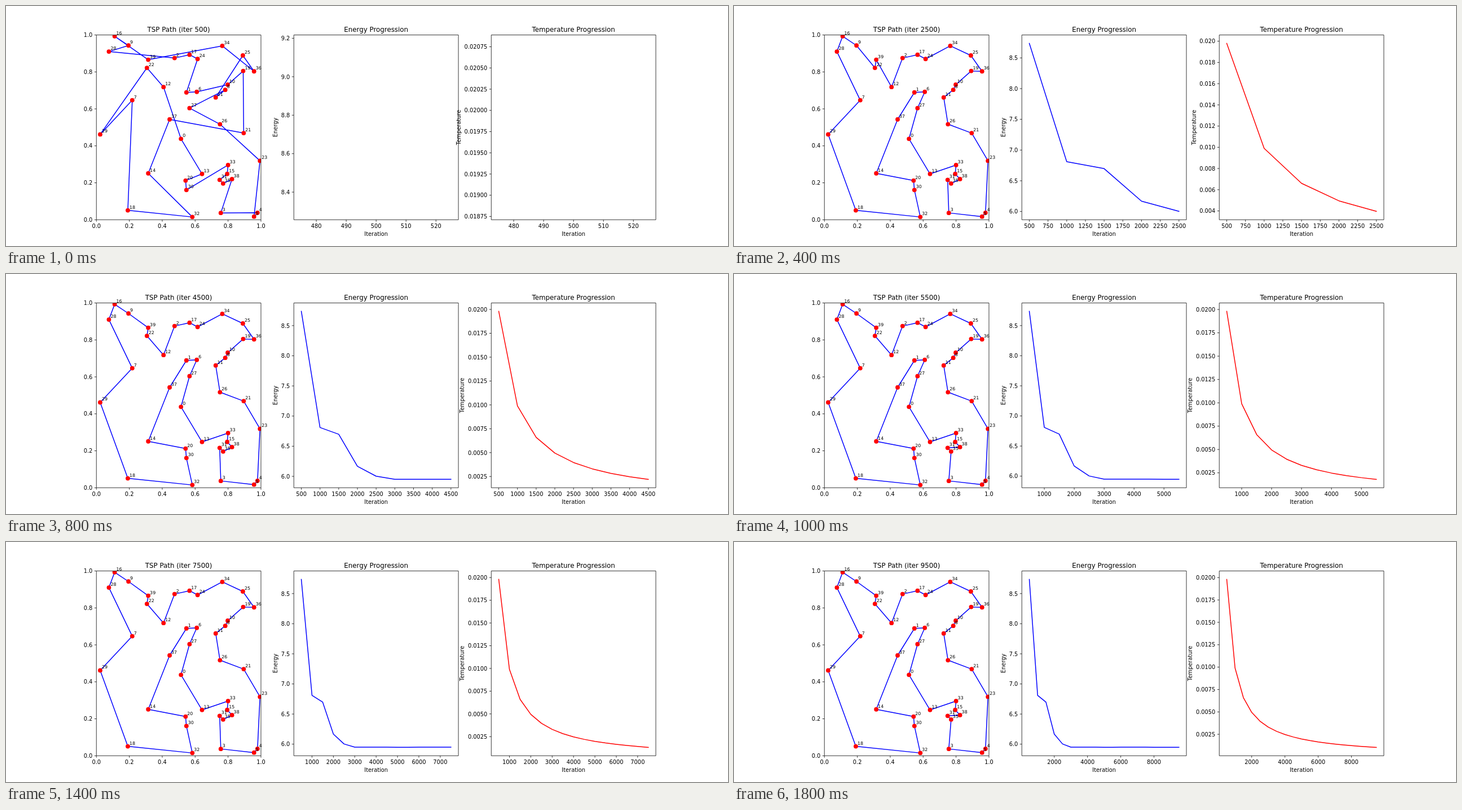
Write an HTML page with a canvas that moves like this. It is 1280x427 px and loops after 1.9 s.

```html
<!DOCTYPE html>
<html lang="en">
<head>
<meta charset="utf-8">
<title>Simulated annealing progress</title>
<style>
  html, body { margin: 0; width: 100%; height: 100%; overflow: hidden; background: #fff; }
  canvas { display: block; }
</style>
</head>
<body>
<canvas id="stage" width="1280" height="427"></canvas>
<script>
const ctx = document.getElementById('stage').getContext('2d');
const PT = 0.98765;                      // one typographic point in stage pixels
const TOP = 51.5, BOTTOM = 380.3, WIDTH = 291.76, HEIGHT = BOTTOM - TOP;
const LEFTS = [160.25, 510.3, 860.3];
const STEP_MS = 100, STEPS = 19, ITERATIONS = 500;

// City positions in thousandths of the unit square; the index is the label.
const cities = `514,438 547,689 475,875 756,37 979,38 958,17 610,692 218,647 783,703 195,943
  798,731 725,662 408,718 642,248 315,251 795,248 111,993 566,893 191,51 892,805
  542,212 895,469 307,822 994,319 615,870 890,889 751,517 566,604 76,910 23,462
  547,161 749,216 583,15 800,296 765,941 770,196 958,803 445,543 824,220 315,866`
  .split(/\s+/).map(pair => pair.split(',').map(v => v / 1000));

const distance = (a, b) =>
  Math.hypot(cities[a][0] - cities[b][0], cities[a][1] - cities[b][1]);

// Closed tour through the waypoints; every other city joins where its detour is shortest.
function tourThrough(waypoints) {
  const tour = waypoints.split(' ').map(Number);
  for (let city = 0; city < cities.length; city++) {
    if (tour.includes(city)) continue;
    const detours = tour.map((a, i) => {
      const b = tour[(i + 1) % tour.length];
      return distance(a, city) + distance(city, b) - distance(a, b);
    });
    tour.splice(detours.indexOf(Math.min(...detours)) + 1, 0, city);
  }
  return tour.join(' ');
}

// Working back from the best tour, each one has another stretch out of order.
const start = tourThrough('16 9 28 2 17 24 6 10 19 21 37 14 32 7 29 22 13 30 33 31 38 4 5 23 26 27 8 11 25 36 34 39');
const best = tourThrough('16 12 34 36 19 23 3 33 0 6 14 32 29');
const settled = best.replace('35 31', '31 35');
const fourth = settled.replace('39 22', '22 39');
const third = fourth.replace('39 12 2', '39 2 12').replace('27 6 1', '1 6 27');
const second = third.replace('19 10 8 11 26 21', '10 11 8 19 21 26');
const first = second.replace('20 30', '30 20').replace(' 4 5 ', ' 5 4 ');
const opening = [start, first, second, third, fourth];

const isBest = k => k === 9 || k === 10 || k >= 15;
const tours = Array.from({ length: STEPS }, (_, k) =>
  (opening[k] || (isBest(k) ? best : settled)).split(' '));
const energies = tours.map(tour =>
  tour.reduce((sum, city, i) => sum + distance(city, tour[(i + 1) % tour.length]), 0));

const iterationAt = k => (k + 1) * ITERATIONS;
const energyAt = k => energies[k];
const temperatureAt = k => 9.9 / iterationAt(k);

function text(str, x, y, size, align = 'center') {
  ctx.font = `${size * PT}px "DejaVu Sans", sans-serif`;
  ctx.textAlign = align;
  ctx.fillStyle = '#000';
  ctx.fillText(str, x, y);
}

function stroke(points, color, width, close) {
  ctx.beginPath();
  for (const [x, y] of points) ctx.lineTo(x, y);
  if (close) ctx.closePath();
  ctx.strokeStyle = color;
  ctx.lineWidth = width;
  ctx.stroke();
}

// Data limits with a 5% margin; a single value is widened first.
function limits(values) {
  let lo = Math.min(...values), hi = Math.max(...values);
  if (lo === hi) { lo *= 0.95; hi *= 1.05; }
  const margin = (hi - lo) * 0.05;
  return [lo - margin, hi + margin];
}

// About nine intervals at most, with steps of 1, 2, 2.5 or 5 times a power of ten.
function ticks([lo, hi]) {
  const raw = (hi - lo) / 9;
  const power = 10 ** Math.floor(Math.log10(raw));
  const step = power * [1, 2, 2.5, 5, 10].find(m => m * power >= raw * 0.99);
  let digits = 0;
  while (Math.abs(step * 10 ** digits - Math.round(step * 10 ** digits)) > 1e-6) digits++;
  const list = [];
  for (let n = Math.ceil(lo / step - 1e-9); n * step <= hi + step * 1e-9; n++)
    list.push({ value: n * step, label: (n * step).toFixed(digits) });
  return list;
}

function axes(left, title, xLim, yLim, yLabel) {
  const toX = v => left + WIDTH * (v - xLim[0]) / (xLim[1] - xLim[0]);
  const toY = v => BOTTOM - HEIGHT * (v - yLim[0]) / (yLim[1] - yLim[0]);
  const tick = 3.5 * PT;
  const right = left + WIDTH;
  stroke([[left, TOP], [right, TOP], [right, BOTTOM], [left, BOTTOM]], '#000', 0.78, true);
  for (const { value, label } of ticks(xLim)) {
    const x = toX(value);
    stroke([[x, BOTTOM], [x, BOTTOM + tick]], '#000', 0.78);
    text(label, x, 394.8, 10);
  }
  let labelWidth = 0;
  for (const { value, label } of ticks(yLim)) {
    const y = toY(value);
    stroke([[left, y], [left - tick, y]], '#000', 0.78);
    text(label, left - 2 * tick, y + 3.7, 10, 'right');
    labelWidth = Math.max(labelWidth, ctx.measureText(label).width);
  }
  text(title, left + WIDTH / 2, 45.5, 12);
  if (yLabel) {
    text('Iteration', left + WIDTH / 2, 408.7, 10);
    ctx.save();
    ctx.translate(left - 2 * tick - labelWidth - 6.5 * PT, (TOP + BOTTOM) / 2);
    ctx.rotate(-Math.PI / 2);
    text(yLabel, 0, 0, 10);
    ctx.restore();
  }
  return { toX, toY };
}

function drawTour(k) {
  const left = LEFTS[0];
  const place = city => [left + WIDTH * cities[city][0], BOTTOM - HEIGHT * cities[city][1]];
  ctx.save();
  ctx.beginPath();
  ctx.rect(left, TOP, WIDTH, HEIGHT);
  ctx.clip();
  stroke(tours[k].map(place), '#00f', 1.5 * PT, true);
  ctx.fillStyle = '#f00';
  for (const city of tours[k]) {
    ctx.beginPath();
    ctx.arc(...place(city), 3.9, 0, 2 * Math.PI);
    ctx.fill();
  }
  ctx.restore();
  axes(left, `TSP Path (iter ${iterationAt(k)})`, [0, 1], [0, 1]);
  for (const city of tours[k]) {
    const [x, y] = place(city);
    text(city, x + 3 * PT, y - 3 * PT, 8, 'left');
  }
}

function drawChart(k, left, name, valueAt, color) {
  const steps = Array.from({ length: k + 1 }, (_, i) => i);
  const { toX, toY } = axes(left, `${name} Progression`,
    limits(steps.map(iterationAt)), limits(steps.map(valueAt)), name);
  if (k > 0) {
    ctx.lineCap = 'square';
    stroke(steps.map(i => [toX(iterationAt(i)), toY(valueAt(i))]), color, 1.5 * PT);
    ctx.lineCap = 'butt';
  }
}

function render() {
  const k = Math.floor(performance.now() / STEP_MS) % STEPS;
  ctx.fillStyle = '#fff';
  ctx.fillRect(0, 0, 1280, 427);
  ctx.lineJoin = 'round';
  drawTour(k);
  drawChart(k, LEFTS[1], 'Energy', energyAt, '#00f');
  drawChart(k, LEFTS[2], 'Temperature', temperatureAt, '#f00');
  requestAnimationFrame(render);
}
render();
</script>
</body>
</html>
```
